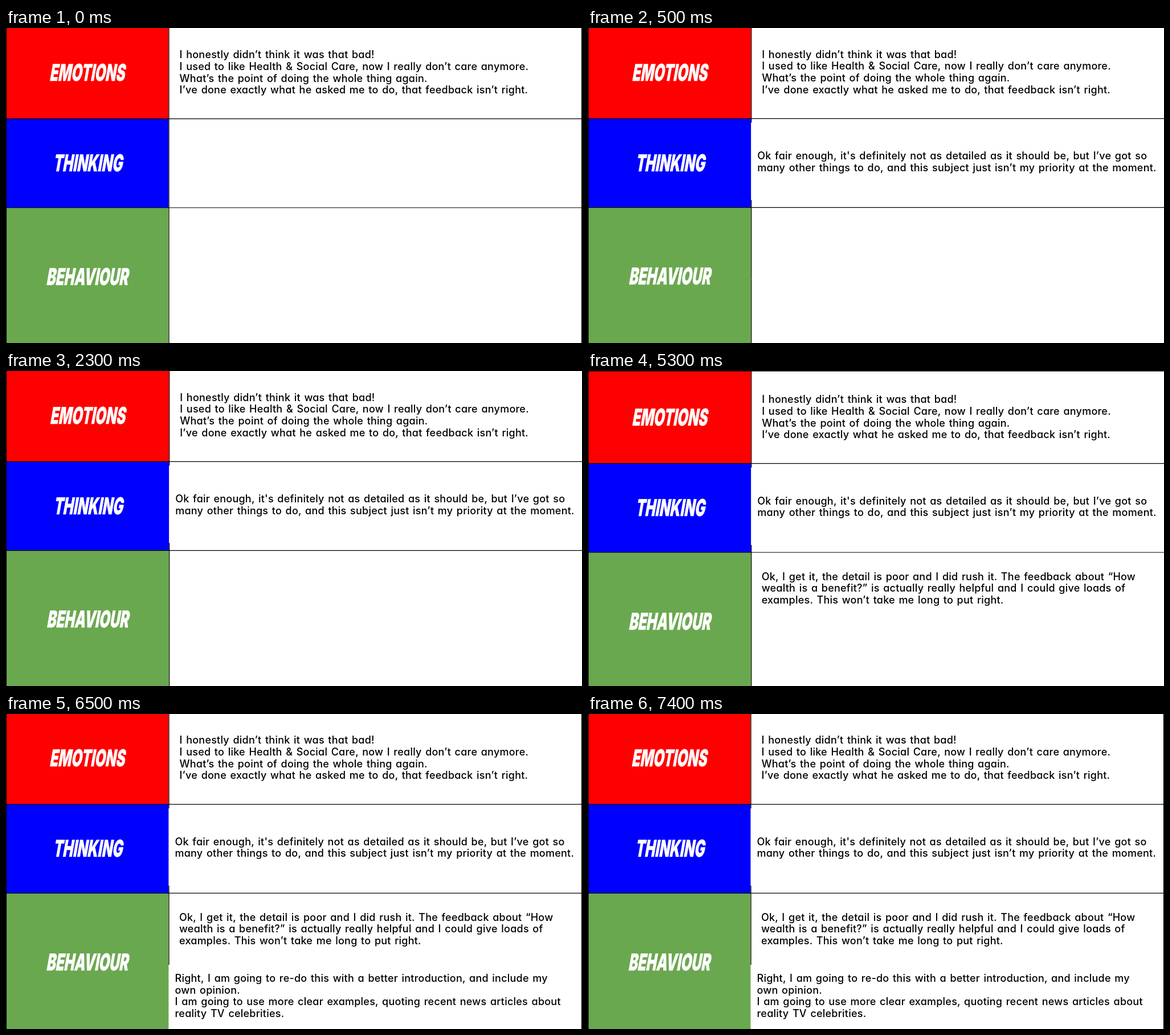
Animation, 1011 px wide and 554 px high, one loop 8000 ms. Source, as an HTML page:

```html
<!DOCTYPE html>
<html lang="en">
<head>
<meta charset="utf-8">
<style>
  html, body { margin: 0; width: 100%; height: 100%; overflow: hidden; background: #fff; }
  svg { display: block; }
  .heading {
    font: 900 41px Inter, Roboto, sans-serif;
    fill: #fff; stroke: #fff; stroke-width: .4; text-anchor: middle;
  }
  .note {
    font: 550 18px Inter, Lato, sans-serif;
    font-feature-settings: "cv11";
    letter-spacing: .23px; word-spacing: 1.5px;
  }
  .rule { stroke: #000; stroke-width: 1.2; }
</style>
</head>
<body>
<svg width="1011" height="554" viewBox="0 0 1011 554">
  <g id="table"></g>
  <path class="rule" d="M.5 0V554"/>
</svg>
<script>
const LOOP = 8000;
// Start time, sheet offset, and number of notes shown
const steps = [
  { at: 0,    dx: 0,  dy: 0,   notes: 1 },
  { at: 500,  dx: .7, dy: -.4, notes: 2 },
  { at: 3500, dx: .7, dy: 3,   notes: 3 },
  { at: 6500, dx: 0,  dy: -.9, notes: 4 },
];

const rows = [
  { label: "EMOTIONS",  color: "#f00",    top: -2.9,  bottom: 159.7, x: 144.5, y: 93 },
  { label: "THINKING",  color: "#00f",    top: 159.7, bottom: 316,   x: 145.5, y: 252 },
  { label: "BEHAVIOUR", color: "#6aa84f", top: 316,   bottom: 560,   x: 144.5, y: 451.5 },
];

const notes = [
  { x: 304.5, y: 53.3, lines: [
    "I honestly didn’t think it was that bad!",
    "I used to like Health & Social Care, now I really don’t care anymore.",
    "What’s the point of doing the whole thing again.",
    "I’ve done exactly what he asked me to do, that feedback isn’t right."] },
  { x: 296.5, y: 231.5, lines: [
    "Ok fair enough, it's definitely not as detailed as it should be, but I’ve got so",
    "many other things to do, and this subject just isn’t my priority at the moment."] },
  { x: 304, y: 364.5, lines: [
    "Ok, I get it, the detail is poor and I did rush it. The feedback about “How",
    "wealth is a benefit?” is actually really helpful and I could give loads of",
    "examples. This won’t take me long to put right."] },
  { x: 296.5, y: 472, lines: [
    "Right, I am going to re-do this with a better introduction, and include my",
    "own opinion.",
    "I am going to use more clear examples, quoting recent news articles about",
    "reality TV celebrities."] },
];

const table = document.getElementById("table");

function add(name, attrs, text = "") {
  const el = document.createElementNS("http://www.w3.org/2000/svg", name);
  for (const key in attrs) el.setAttribute(key, attrs[key]);
  el.textContent = text;
  return table.appendChild(el);
}
const rule = d => add("path", { class: "rule", d });

for (const r of rows) {
  add("rect", { x: -2, y: r.top, width: 287.4, height: r.bottom - r.top, fill: r.color });
  add("text", {
    class: "heading",
    transform: `translate(${r.x - 2.5} ${r.y}) skewX(-10) scale(.585 1)`,
  }, r.label);
}
for (const r of rows) rule(`M-2 ${r.top}H1013`);

rule("M286 -3V167M286 303V442");
const thinkingDivider = rule("M286 167V303");
const bottomDivider = rule("M286 442V560");
const rightEdge = rule("M1010.5 -3V560");

const noteLines = notes.map(n => n.lines.map((line, i) =>
  add("text", { class: "note", x: n.x, y: n.y + i * 20.6 }, line)));

const show = (el, on) => el.setAttribute("visibility", on ? "visible" : "hidden");

function draw() {
  const t = performance.now() % LOOP;
  const step = steps.findLast(s => s.at <= t);
  table.setAttribute("transform", `translate(${step.dx} ${step.dy})`);
  noteLines.forEach((lines, i) => lines.forEach(el => show(el, i < step.notes)));
  // Text boxes cover the divider beside them
  show(thinkingDivider, step.notes < 2);
  show(bottomDivider, step.notes < 4);
  show(rightEdge, step.dx === 0);
  requestAnimationFrame(draw);
}
draw();
</script>
</body>
</html>
```
